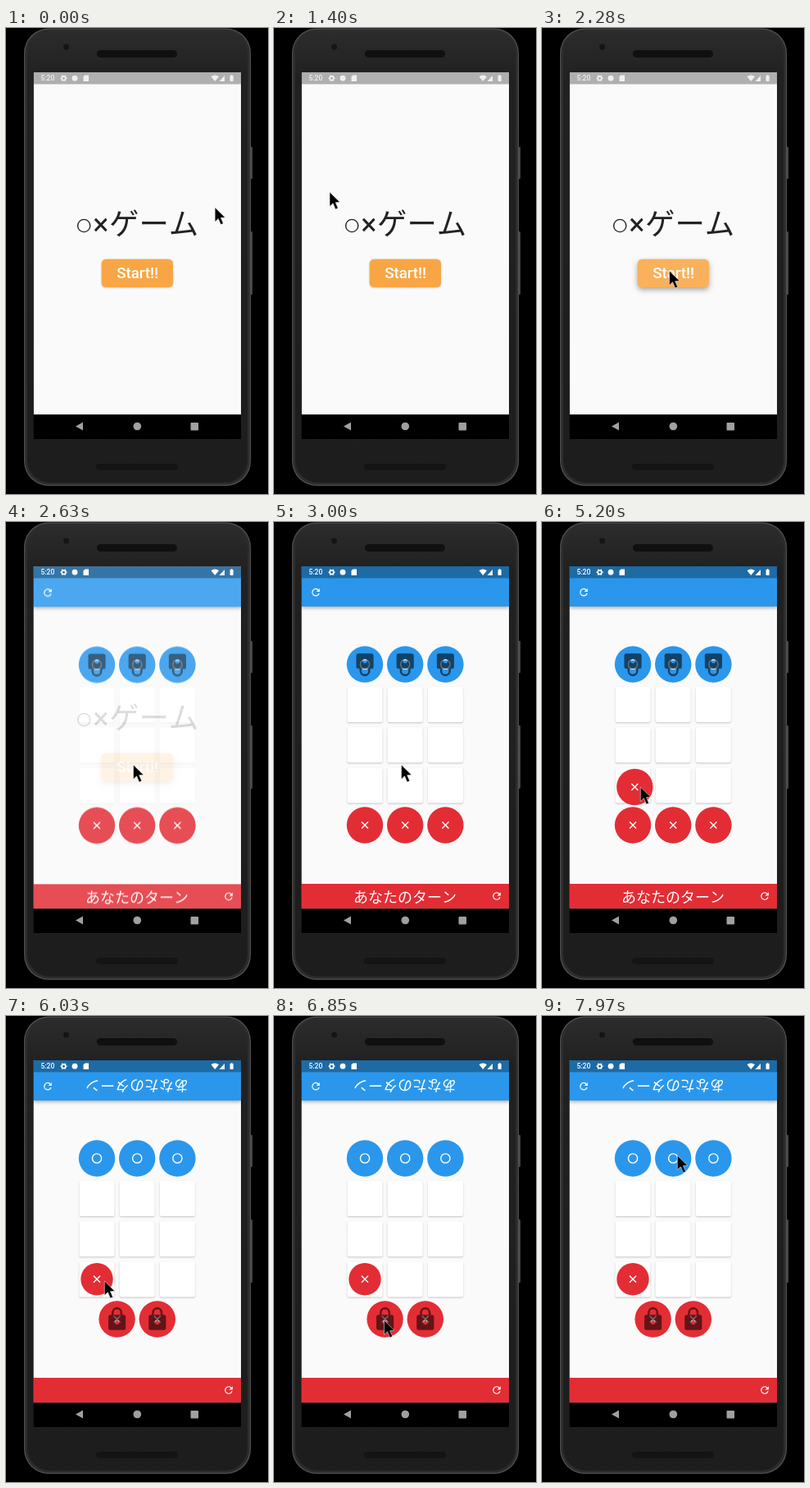
These frames come from a looping animation (320 px wide and 568 px high, 8 s). An HTML page with a canvas:

```html
<!DOCTYPE html>
<html lang="ja">
<head>
<meta charset="utf-8">
<title>○×ゲーム</title>
<style>
  html, body { margin: 0; width: 100%; height: 100%; overflow: hidden; background: #000; }
  canvas { display: block; width: 320px; height: 568px; }
</style>
</head>
<body>
<canvas id="stage"></canvas>
<script>
const W = 320, H = 568, LOOP = 8000, TAU = Math.PI * 2;
const BLUE = '#2a97ec', RED = '#e32d35', PAPER = '#fafafa';
const SCREEN = { x: 33.7, y: 54, w: 253.3, h: 417.3 };
const R = 22.2, TOP_Y = 173.5, LOW_Y = 369.5;
const spread = (mid, gap, n) => Array.from({ length: n }, (_, i) => mid + gap * (i - (n - 1) / 2));
const COLS = spread(160.2, 49.2, 3), ROWS = spread(272, 49.2, 3);
const JP = '"Noto Sans CJK JP", "Noto Sans CJK", sans-serif';
const T = { press: 2200, page: 2360, fade: 300, grab: 4600, drop: 5660 };

// Pointer moves: begin, end, and where it comes to rest
const HOME = [255.2, 218.7];
const MOVES = [
  [800, 1170, 68, 200],
  [1400, 1620, 8, 238],
  [1620, 1960, 190, 305],
  [1960, 2200, 155.5, 296],
  [3620, 3840, 120.5, 309],
  [4220, 4480, 118, 369],
  [4680, 5020, 120.3, 323],
  [6450, 6750, 134.5, 371],
  [7320, 7780, 165.3, 170]
];

const dpr = window.devicePixelRatio || 1;
const setup = c => {
  c.width = W * dpr;
  c.height = H * dpr;
  const g = c.getContext('2d');
  g.scale(dpr, dpr);
  return g;
};
const stage = setup(document.getElementById('stage'));
const layer = document.createElement('canvas');
const sheet = setup(layer);

const clamp = v => Math.min(1, Math.max(0, v));
const smooth = v => v * v * (3 - 2 * v);

function pointerAt(t) {
  let [x, y] = HOME;
  for (const [begin, end, toX, toY] of MOVES) {
    const k = smooth(clamp((t - begin) / (end - begin)));
    x += (toX - x) * k;
    y += (toY - y) * k;
  }
  return [x, y];
}

function rect(g, color, x, y, w, h, r = 0) {
  g.fillStyle = color;
  g.beginPath();
  g.roundRect(x, y, w, h, r);
  g.fill();
}

const band = (g, color, y, h) => rect(g, color, SCREEN.x, y, SCREEN.w, h);

function disc(g, color, x, y, r) {
  g.fillStyle = color;
  g.beginPath();
  g.arc(x, y, r, 0, TAU);
  g.fill();
}

function ring(g, color, x, y, r, width) {
  g.strokeStyle = color;
  g.lineWidth = width;
  g.beginPath();
  g.arc(x, y, r, 0, TAU);
  g.stroke();
}

function poly(g, color, ...pts) {
  g.fillStyle = color;
  g.beginPath();
  pts.forEach(p => g.lineTo(...p));
  g.closePath();
  g.fill();
}

function text(g, str, x, y, font, color = '#fff', align = 'center') {
  g.font = font;
  g.textAlign = align;
  g.fillStyle = color;
  g.fillText(str, x, y);
}

function shadow(g, alpha, blur, dy, draw) {
  g.save();
  g.shadowColor = `rgba(0,0,0,${alpha})`;
  g.shadowBlur = blur * dpr;
  g.shadowOffsetY = dy * dpr;
  draw();
  g.restore();
}

function at(g, x, y, scale, angle, draw) {
  g.save();
  g.translate(x, y);
  g.rotate(angle);
  g.scale(scale, scale);
  draw();
  g.restore();
}

function refresh(g, x, y) {
  at(g, x, y, 0.6, 0, () => {
    g.strokeStyle = '#fff';
    g.lineWidth = 2.1;
    g.beginPath();
    g.arc(0, 0, 7, 0.3, TAU - 0.75);
    g.stroke();
    poly(g, '#fff', [8, -8], [8, -1], [1, -1]);
  });
}

function lock(g, x, y, angle) {
  at(g, x, y, 1.32, angle, () => {
    g.fillStyle = g.strokeStyle = 'rgba(0,0,0,.56)';
    g.beginPath();
    g.roundRect(-8, -4, 16, 14, 2);
    g.arc(0, 3, 2, 0, TAU, true);
    g.fill('evenodd');
    g.lineWidth = 1.9;
    g.beginPath();
    g.moveTo(-4, -4);
    g.lineTo(-4, -6);
    g.arc(0, -6, 4, Math.PI, 0);
    g.lineTo(4, -4);
    g.stroke();
  });
}

function bluePiece(g, x, y, locked) {
  disc(g, BLUE, x, y, R);
  ring(g, '#fff', x, y, 5.6, 1.4);
  if (locked) lock(g, x, y, Math.PI);
}

function redPiece(g, x, y, locked, r = R) {
  disc(g, RED, x, y, r);
  g.strokeStyle = '#fff';
  g.lineWidth = 1.4;
  g.beginPath();
  for (const s of [-1, 1]) {
    g.moveTo(x - 4, y - 4 * s);
    g.lineTo(x + 4, y + 4 * s);
  }
  g.stroke();
  if (locked) lock(g, x, y, 0);
}

function phone(g) {
  rect(g, '#000', 0, 0, W, H);
  rect(g, '#484848', 297, 145, 4, 39, 1);
  rect(g, '#484848', 297, 248, 4, 77, 1);
  rect(g, '#505050', 22, 0.5, 277, 557.5, 30);
  rect(g, '#2c2c2c', 23.2, 1.7, 274.6, 555, 29);
  const face = g.createLinearGradient(0, 2, 0, 555);
  face.addColorStop(0, '#2c2c2c');
  face.addColorStop(0.1, '#212121');
  face.addColorStop(1, '#1d1d1d');
  rect(g, face, 26, 4, 269, 550, 27);
  rect(g, '#101010', 111, 27, 98, 9, 4.5);
  rect(g, '#141414', 110, 531, 100, 8, 4);
  disc(g, '#151515', 73.5, 23, 3.5);

  band(g, '#000', 471, 30);
  const grey = '#a0a0a0';
  poly(g, grey, [85, 485.5], [94, 480.5], [94, 490.5]);
  disc(g, grey, 160.3, 485.5, 4.8);
  rect(g, grey, 225.5, 481, 9.5, 9.5, 1);
}

function statusBar(g, alpha) {
  const y = 61.2;
  band(g, 'rgba(0,0,0,.3)', 54, 14.5);
  g.globalAlpha = alpha;
  text(g, '5:20', 42.5, 64.4, '500 8.5px Roboto, sans-serif', '#fff', 'left');
  ring(g, '#fff', 70.5, y, 2.4, 1.7);
  for (let a = 0; a < 6; a++)
    at(g, 70.5, y, 1, a * TAU / 6, () => disc(g, '#fff', 3.5, 0, 0.7));
  disc(g, '#fff', 84, y, 3.4);
  poly(g, '#fff', [96.5, 57.5], [101, 57.5], [101, 65], [94.5, 65], [94.5, 59.5]);
  g.beginPath();
  g.moveTo(255.2, 65);
  g.arc(255.2, 65, 7.4, -TAU * 0.36, -TAU * 0.14);
  g.fill();
  poly(g, '#fff', [267, 58], [267, 65], [260.5, 65]);
  rect(g, '#fff', 273.5, 58, 4.2, 7, 1);
  rect(g, '#fff', 274.8, 57.2, 1.6, 1.5);
  g.globalAlpha = 1;
}

function titlePage(g, t) {
  const ink = '#222';
  band(g, PAPER, SCREEN.y, SCREEN.h);
  ring(g, ink, 95.2, 241, 7.6, 1.4);
  text(g, '×', 115.8, 252, '36px Roboto, sans-serif', ink);
  text(g, 'ゲーム', 126, 252, '36.4px ' + JP, ink, 'left');

  const lift = smooth(clamp((t - T.press) / 80));
  const box = [116.7, 281.7, 87.3, 34.3, 5.5];
  shadow(g, 0.25 + lift * 0.1, 2 + lift * 4, 0.6 + lift * 2.4, () => rect(g, '#f8a645', ...box));
  rect(g, `rgba(255,255,255,${0.12 * lift})`, ...box);
  text(g, 'Start!!', 160.6, 305.2, '500 18.7px Roboto, sans-serif');
}

function gamePage(g, t) {
  const moved = t >= T.drop;
  band(g, PAPER, SCREEN.y, SCREEN.h);
  shadow(g, 0.3, 4, 1.5, () => band(g, BLUE, 54, 49));
  refresh(g, 51, 85.7);
  band(g, RED, 441, 30.3);
  refresh(g, 272, 456);

  const font = '18px ' + JP, label = 'あなたのターン';
  if (moved) at(g, 160, 85, 1, Math.PI, () => text(g, label, 0, 7, font));
  else text(g, label, 160, 464, font);

  // Cell shadows settle in after the page has faded up
  const settle = 0.22 * clamp((t - T.page - 200) / 300);
  for (const y of ROWS)
    for (const x of COLS)
      shadow(g, settle, 2, 1, () => rect(g, '#fff', x - 21.5, y - 21.7, 43, 43, 2));

  COLS.forEach(x => bluePiece(g, x, TOP_Y, !moved));
  if (moved) redPiece(g, COLS[0], ROWS[2] - 0.4, false, 19.7);
  spread(160.2, 49.2, moved ? 2 : 3).forEach(x => redPiece(g, x, LOW_Y, moved));
  if (!moved && t > T.grab) {
    const [x, y] = pointerAt(t);
    redPiece(g, x - 7, y, false);
  }
}

function pointer(g, t) {
  at(g, ...pointerAt(t), 1.02, 0, () => {
    poly(g, '#000', [0, 0], [0, 17.2], [4, 13.5], [7, 20.5], [10, 19.2], [7, 12.4], [12.2, 12]);
    g.strokeStyle = 'rgba(255,255,255,.7)';
    g.lineWidth = 0.7;
    g.stroke();
  });
}

function draw(t) {
  const g = stage;
  phone(g);
  g.save();
  g.beginPath();
  g.rect(SCREEN.x, SCREEN.y, SCREEN.w, SCREEN.h);
  g.clip();
  const k = clamp((t - T.page) / T.fade);
  if (k < 1) titlePage(g, t);
  if (k > 0) {
    gamePage(sheet, t);
    g.globalAlpha = k ** 1.7;
    g.drawImage(layer, 0, 104 * (1 - k) ** 2.4, W, H);
    g.globalAlpha = 1;
  }
  statusBar(g, 0.8 + 0.2 * k);
  g.restore();
  pointer(g, t);
}

function tick() {
  draw(performance.now() % LOOP);
  requestAnimationFrame(tick);
}
tick();
</script>
</body>
</html>
```
